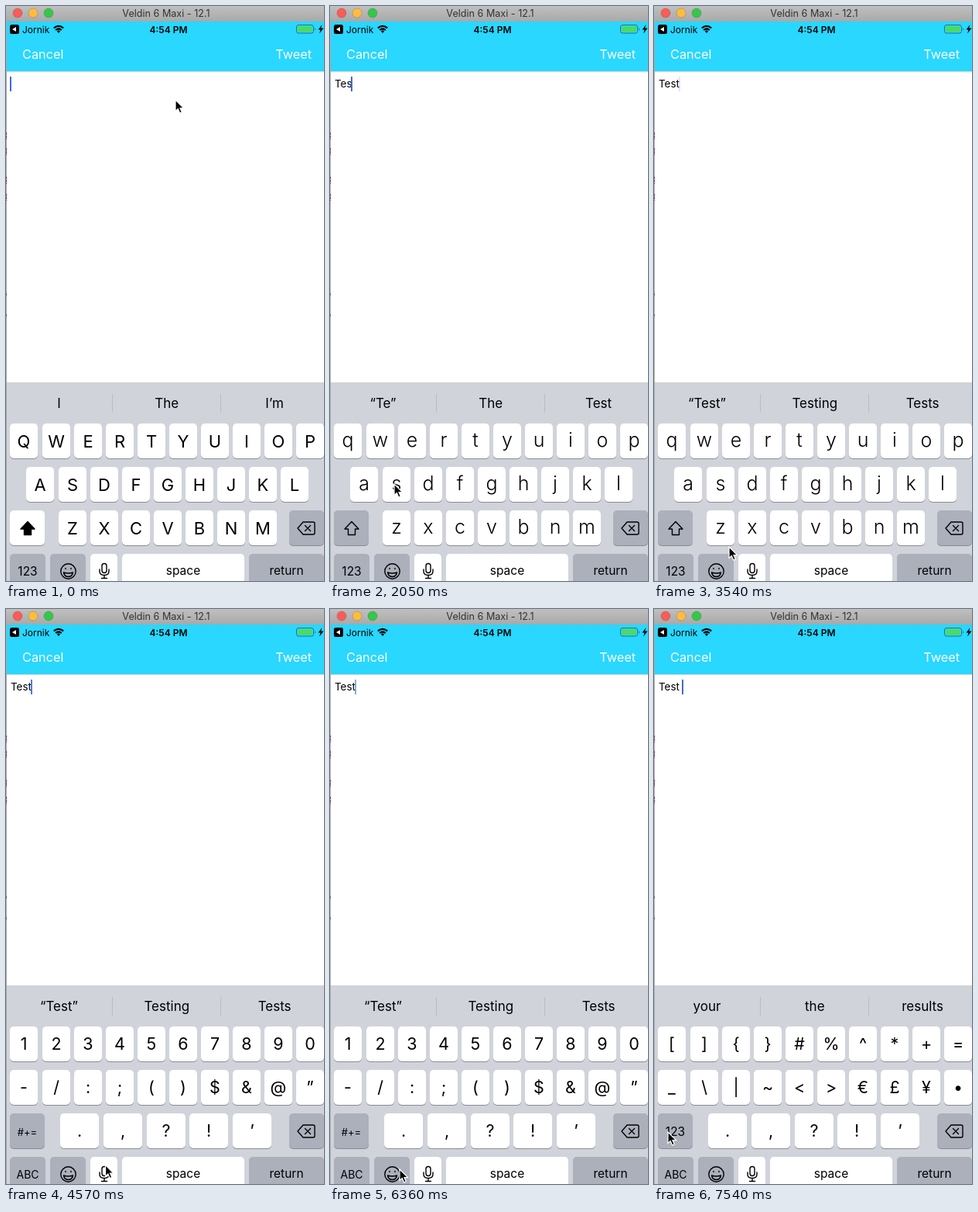
Animation, 411 px wide and 741 px high, one loop 8000 ms. Source, as an HTML page:

```html
<!DOCTYPE html>
<html lang="en">
<head>
<meta charset="utf-8">
<title>Compose screen</title>
<style>
  html, body { margin: 0; width: 100%; height: 100%; overflow: hidden; background: #fff; }
  svg { display: block; width: 411px; height: 741px; font-family: Inter, "Open Sans", sans-serif; }
  text { white-space: pre; }
  .mid { text-anchor: middle; }
  .icon { fill: none; stroke: #000; stroke-width: 1.4; stroke-linecap: round; stroke-linejoin: round; }
</style>
</head>
<body>
<svg viewBox="0 0 411 741" xmlns="http://www.w3.org/2000/svg">
  <defs>
    <linearGradient id="chrome" x2="0" y2="1">
      <stop stop-color="#bfbfbf"/><stop offset="1" stop-color="#a9a9a9"/>
    </linearGradient>
  </defs>
  <rect width="411" height="741" fill="#fff"/>
  <rect y="20" width="411" height="64" fill="#29d7ff"/>
  <rect y="84" width="411" height="1" fill="#cbd8dc"/>
  <rect width="411" height="20" fill="url(#chrome)"/>
  <g stroke="#000" stroke-opacity=".15">
    <circle cx="15" cy="9" r="6" fill="#fc5b57"/>
    <circle cx="35" cy="9" r="6" fill="#fdbc40"/>
    <circle cx="55" cy="9" r="6" fill="#34c84a"/>
  </g>
  <text class="mid" x="207" y="14" font-size="12.6" fill="#333">Veldin 6 Maxi - 12.1</text>

  <rect x="5" y="24" width="12" height="12" rx="2.5"/>
  <path d="M13 27v6l-5-3z" fill="#fff"/>
  <text x="21" y="34.5" font-size="12">Jornik</text>
  <path d="M61.8 28.4q6.2-5 12.4 0M64.2 31q3.8-3 7.6 0" fill="none" stroke="#000" stroke-width="2.2"/>
  <path d="M65.8 32.2q2.2-1.6 4.4 0L68 35z"/>
  <text class="mid" x="210" y="34.5" font-size="12" font-weight="600">4:54 PM</text>
  <rect x="375.5" y="24.500" width="22" height="10.5" rx="2.5" fill="none" stroke="#27748a"/>
  <rect x="377" y="26" width="19" height="7.5" rx="1" fill="#4cd964"/>
  <path d="M399 28v4q2-2 0-4" fill="#27748a"/>
  <path d="M408.5 24l-5 6.500h3l-1.500 5 5.500-7h-3.500z"/>
  <g font-size="16.3" fill="#fff">
    <text x="21" y="68">Cancel</text>
    <text x="395" y="68" text-anchor="end">Tweet</text>
  </g>

  <rect y="485" width="411" height="256" fill="#d0d3da"/>
  <path d="M.5 20V741" stroke="#aaa"/>
  <path d="M.5 163v9M.5 183v9M.5 220v9M.5 242v9" stroke="#7d2a80" stroke-dasharray="3 1"/>
  <path d="M.5 370v3M.5 397v3" stroke="#666"/>
  <rect id="selection" x="3" y="91" height="20" fill="#c6d9f1"/>
  <text id="entry" x="6" y="105" font-size="13.4"></text>
  <rect id="caret" y="91" width="2" height="19" fill="#4169d9"/>
  <g id="hints"></g>
  <g id="keys"></g>
  <path id="pointer" d="M0 0V14.5L3.3 11.5 5.7 17 8.3 15.9 6 10.6H10.5Z" stroke="#fff" stroke-width="1.2"/>
</svg>
<script>
const $ = id => document.getElementById(id);
const LOOP = 8000, STEPS = 54, STEP = 147.7;
const WHITE = '#fff', GREY = '#abb0bb';

const label = (x, y, s, size, weight = 400) =>
  `<text class="mid" x="${x}" y="${y}" font-size="${size}" font-weight="${weight}">${s}</text>`;

const rect = (x, y, w, h, fill, r = 0) =>
  `<rect x="${x}" y="${y}" width="${w}" height="${h}" rx="${r}" fill="${fill}"/>`;

const key = (x, y, w, fill = WHITE) =>
  rect(x, y + 1, w, 45, '#898c92', 5) + rect(x, y, w, 45, fill, 5);

// Rows of keys sit 56px apart and columns share one pitch.
const rowTop = r => 538 + 56 * r;

function row(chars, r, indent, face, pitch = 41.1, width = 36) {
  return chars.split(' ').map((c, i) => {
    const x = Math.round(indent + i * pitch);
    return key(x, rowTop(r), width) +
      label(x + width / 2, rowTop(r) + face.base, c, face.size, face.weight);
  }).join('');
}

const shiftIcon = solid =>
  `<path class="icon" d="M28 664.5l9 9.5h-4.5v7.5h-9V674H19z" style="fill:${solid ? '#000' : 'none'}"/>`;

const controls = mode =>
  key(366, 650, 45, GREY) + key(5, 706, 46, GREY) + key(57, 706, 46, GREY) +
  key(109, 706, 35) + key(150, 706, 158) + key(314, 706, 97, GREY) +
  label(28, 733.5, mode, mode === 'ABC' ? 14 : 15.5) +
  label(229, 733, 'space', 15.5) + label(362.5, 733, 'return', 15.5) +
  `<g class="icon">
    <path d="M384 665h13q2 0 2 2v12q0 2-2 2h-13l-7-8zM386.5 669.5l7 7m0-7l-7 7"/>
    <circle cx="80.5" cy="728.5" r="9.7"/>
    <path d="M74.5 730q6 2 12 0-1 5.5-6 5.5t-6-5.5zM77 724.500v1M84 724.500v1"/>
    <rect x="124" y="718.5" width="6" height="12" rx="3"/>
    <path d="M121 726v2.5q0 5 6 5t6-5V726M127 733.5v4M123.5 737.5h7"/>
  </g>`;

function letters(upper) {
  const face = upper ? { size: 22, base: 31, weight: 400 } : { size: 25, base: 29.5, weight: 300 };
  const rows = ['q w e r t y u i o p', 'a s d f g h j k l', 'z x c v b n m'];
  const indents = [5.4, 26.4, 67.5];
  return rows.map((s, r) => row(upper ? s.toUpperCase() : s, r, indents[r], face)).join('') +
    key(5, 650, 45, upper ? WHITE : GREY) + shiftIcon(upper) + controls('123');
}

function symbols(first, second, toggle) {
  const face = { size: 21.5, base: 30, weight: 400 };
  return row(first, 0, 5.4, face) + row(second, 1, 5.4, face) +
    row('. , ? ! ’', 2, 70, face, 55.8, 50) +
    key(5, 650, 45, GREY) + label(27.5, 678.5, toggle, toggle === '123' ? 15.5 : 13) +
    controls('ABC');
}

const faded = (s, opacity) => `<tspan fill-opacity="${opacity}">${s}</tspan>`;

// What changes at which step; everything else carries over.
const events = [
  { step: 0, text: '', hints: ['I', 'The', 'I’m'], board: letters(true) },
  { step: 6, text: 'T', board: letters(false) },
  { step: 8, hints: ['“T' + faded('”', 0), 'The', 'Th' + faded('i', .3) + faded('s', 0)] },
  { step: 9, hints: ['“T”', 'The', 'This'] },
  { step: 10, text: 'Te' },
  { step: 12, hints: ['“Te”', 'The', 'Test'] },
  { step: 14, text: 'Tes' },
  { step: 16, hints: ['“Tes”', 'Yes', 'Test'], corrected: true },
  { step: 19, text: 'Test', corrected: false },
  { step: 21, hints: ['“Test”', 'Testing', 'Tests'] },
  { step: 28, board: symbols('1 2 3 4 5 6 7 8 9 0', '- / : ; ( ) $ &amp; @ ”', '#+=') },
  { step: 45, text: 'Test ' },
  { step: 46, hints: ['“Te' + faded('s', .5) + faded('t', .15),
      faded('Te', .25) + 'stin' + faded('e', .25), faded('r', 0) + 'es' + faded('u', .6) + 'ts'] },
  { step: 47, hints: ['your', 'the', 'results'] },
  { step: 50, board: symbols('[ ] { } # % ^ * + =', '_ \\ | ~ &lt; &gt; € £ ¥ •', '123') }
];

// Pointer stops: step, x, y.
const stops = [
  [0, 219, 121], [6, 184, 562], [8, 129, 562], [10, 104, 566], [14, 83, 616], [18, 171, 570],
  [24, 97, 697], [27, 30, 722], [32, 140, 716], [34, 140, 716], [37, 44, 667],
  [38, 21, 718], [40, 21, 718], [46, 159, 726], [50, 18, 674]
];

function pointerAt(n) {
  const next = stops.findIndex(s => s[0] > n);
  if (next < 0) return stops[stops.length - 1].slice(1);
  const a = stops[next - 1], b = stops[next];
  const k = (n - a[0]) / (b[0] - a[0]), eased = k * k * (3 - 2 * k);
  return [1, 2].map(i => a[i] + (b[i] - a[i]) * eased);
}

// The caret dips out once per blink, counted from the last keystroke.
function caretAlpha(ms) {
  return Math.min(1, Math.abs(ms % 960 - 723) / 100);
}

let shownBoard, shownStep;

function draw(n) {
  const past = events.filter(e => e.step <= n);
  const { text, hints, board, corrected } = Object.assign({}, ...past);
  const lastKey = past.filter(e => 'text' in e).pop().step;

  $('entry').textContent = text;
  const width = text ? $('entry').getComputedTextLength() : 0;
  $('caret').setAttribute('x', Math.round(5 + width));
  $('caret').setAttribute('opacity', caretAlpha((n - lastKey) * STEP));
  $('selection').setAttribute('width', corrected ? width + 5 : 0);

  const frame = corrected ? rect(140, 493, 136, 37, '#e8ecef', 5)
    : [137, 277].map(x => rect(x, 500, 1, 24, '#b9bdc5')).join('');
  $('hints').innerHTML = frame +
    hints.map((s, i) => label(68.5 + 139.3 * i, 518, s, 17)).join('');

  if (board !== shownBoard) $('keys').innerHTML = shownBoard = board;
  $('pointer').setAttribute('transform', `translate(${pointerAt(n)})`);
}

const start = performance.now();
function tick() {
  const t = Math.max(0, performance.now() - start) % LOOP;
  const n = Math.min(STEPS - 1, Math.floor((t + 30) / STEP));
  if (n !== shownStep) draw(shownStep = n);
  requestAnimationFrame(tick);
}
tick();
</script>
</body>
</html>
```
